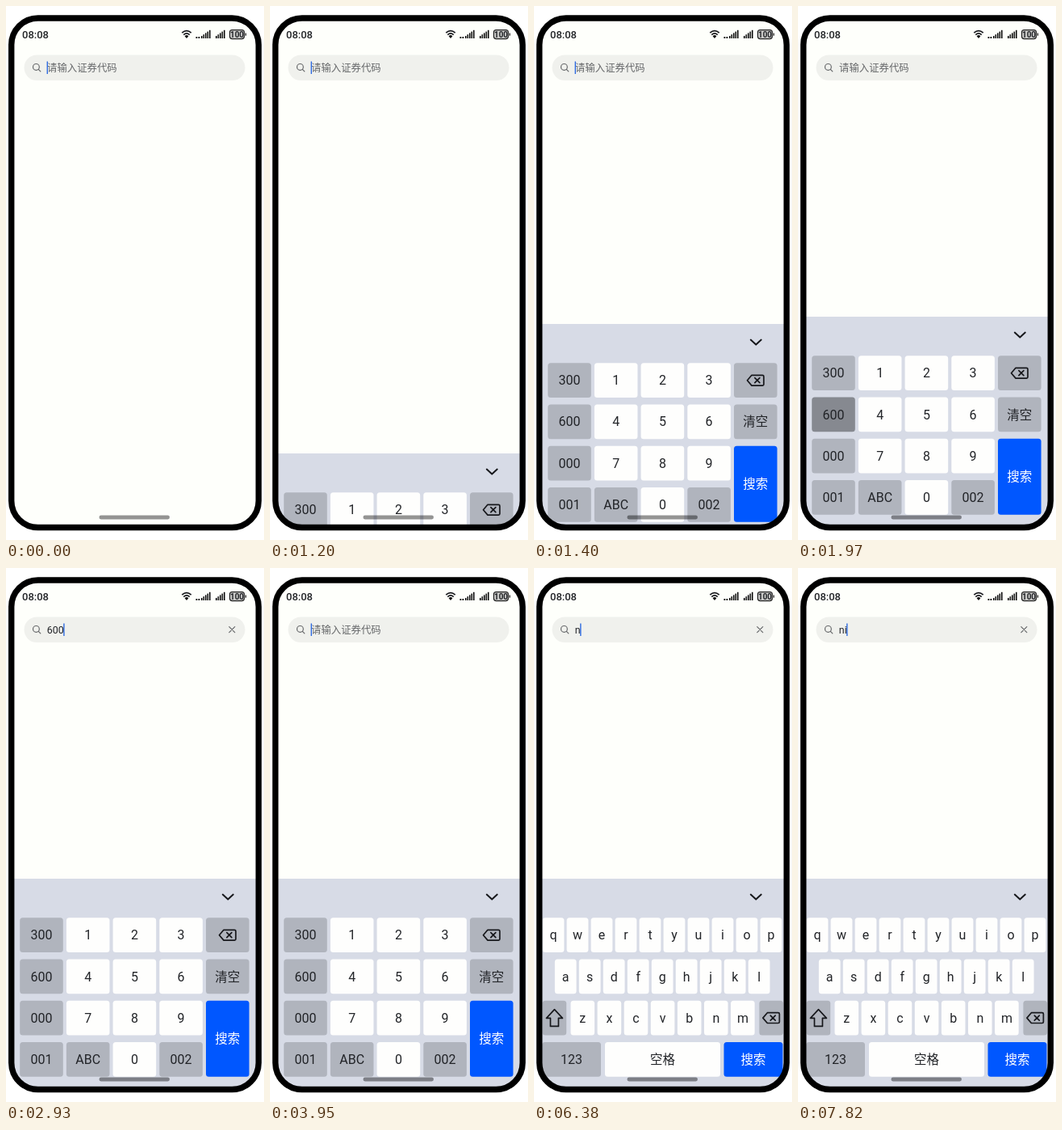
Write an HTML page that moves like this. It is 320 px wide and 660 px high and loops after 8 s.

```html
<!DOCTYPE html>
<html lang="zh">
<head>
<meta charset="utf-8">
<style>
  html, body { margin: 0; width: 320px; height: 660px; overflow: hidden; background: #fff; }
  svg { display: block; }
  text { font-family: Roboto, "Noto Sans CJK SC", "Noto Sans CJK", sans-serif; fill: #222428; }
  .line { fill: none; stroke: #17181c; stroke-width: 1.7; stroke-linecap: round; stroke-linejoin: round; }
</style>
</head>
<body>
<svg width="320" height="660" viewBox="0 0 320 660">
  <clipPath id="screen"><rect x="9" y="17" width="302" height="625" rx="30"/></clipPath>
  <rect x="6.7" y="15" width="306.6" height="629.5" rx="33" fill="#fefffb"/>

  <g id="status">
    <text x="20" y="39.7" font-size="13" font-weight="500" fill="#111">08:08</text>
    <g class="line" stroke-linecap="butt" style="stroke-linecap:butt">
      <path d="M218.3 33.2Q224 28 229.7 33.2M220.3 35.6Q224 32.2 227.7 35.6"/>
    </g>
    <path d="M221.6 37.2Q224 35 226.4 37.2L224 40Z" fill="#111"/>
    <g id="bars" fill="#111"></g>
    <rect x="277.5" y="29.6" width="18" height="11" rx="3" fill="#c9c9c7" stroke="#222" stroke-width="1.2"/>
    <path d="M297.4 33.5v3.2" stroke="#222" stroke-width="1.3"/>
    <text x="286.5" y="38.8" font-size="10" font-weight="700" text-anchor="middle">100</text>
  </g>

  <rect x="22.5" y="60.5" width="274" height="31.5" rx="15.75" fill="#f0f1ed"/>
  <g class="line" style="stroke:#66686a;stroke-width:1.2">
    <circle cx="37.4" cy="75.4" r="3.9"/><path d="M40.3 78.3l2.5 2.5"/>
    <path id="clear" d="M276.8 72.6l7 7m0-7l-7 7"/>
  </g>
  <text id="hint" x="51" y="80.6" font-size="12.4" style="fill:#66686a">请输入证券代码</text>
  <text id="field" x="50.8" y="80.6" font-size="12.4"></text>
  <rect id="caret" y="68.5" width="1.4" height="15.5" fill="#2f6be0"/>

  <g clip-path="url(#screen)">
    <g id="keyboard">
      <rect x="8" y="384" width="304" height="270" fill="#d7dbe6"/>
      <path class="line" style="stroke-width:2" d="M268.8 403.6l6.5 6 6.5-6"/>
      <g id="numeric"></g>
      <g id="letters"></g>
    </g>
  </g>
  <rect x="115.5" y="629.6" width="87.5" height="4.8" rx="2.4" fill="#000" fill-opacity=".42"/>
  <rect x="6.7" y="15" width="306.6" height="629.5" rx="33" fill="none" stroke="#000" stroke-width="7.4"/>
</svg>
<script>
const $ = id => document.getElementById(id);
const WHITE = '#fefefd', GREY = '#b0b4bd', BLUE = '#0057ff';
const ICONS = {
  back: 'M-10.3 0L-4.8-6.4H8.6Q10.2-6.4 10.2-4.8V4.8Q10.2 6.4 8.6 6.4H-4.8ZM-.9-3l6 6m0-6l-6 6',
  shift: 'M0-10.5L10 .2H5V10.3H-5V.2H-10Z'
};
const shades = {};

function add(parent, tag, attrs, text = '') {
  const el = document.createElementNS('http://www.w3.org/2000/svg', tag);
  for (const name in attrs) el.setAttribute(name, attrs[name]);
  el.textContent = text;
  return parent.appendChild(el);
}

function key(board, label, cx, row, w, fill = WHITE, h = 42.8, size = 16) {
  const y = 432.3 + row * 51.2, cy = y + h / 2;
  const box = { x: cx - w / 2, y, width: w, height: h, rx: 3.5 };
  add(board, 'rect', { ...box, fill });
  shades[label] = add(board, 'rect', { ...box, fill: '#000', 'fill-opacity': .24 });
  if (ICONS[label]) {
    add(board, 'path', { class: 'line', d: ICONS[label], transform: `translate(${cx} ${cy})` });
  } else {
    add(board, 'text', {
      x: cx, y: cy + 5.6, 'font-size': size, 'text-anchor': 'middle',
      style: fill === BLUE ? 'fill:#fff' : ''
    }, label);
  }
}

// Status bar signal bars
for (let i = 0; i < 5; i++) {
  const h = 3 + i * 1.8;
  for (const x of [243, 260]) add($('bars'), 'rect', { x: x + i * 2.5 - (x < 250 ? 1 : 0), y: 40 - h, width: 1.6, height: h });
}
for (const x of [235.5, 238.5]) add($('bars'), 'rect', { x, y: 38, width: 1.8, height: 2 });

// Numeric board
const numeric = $('numeric');
['300 1 2 3 back', '600 4 5 6 清空', '000 7 8 9', '001 ABC 0 002'].forEach((line, row) =>
  line.split(' ').forEach((label, col) =>
    key(numeric, label, 44 + col * 57.7, row, 53.6, /^\d$/.test(label) ? WHITE : GREY, 42.8, label === '清空' ? 15.5 : 16)));
key(numeric, '搜索', 274.8, 2, 53.6, BLUE, 94, 15.5);

// Letter board
const letters = $('letters');
[['qwertyuiop', 24, 30, 26.8], ['asdfghjkl', 39.2, 30, 26.8], ['zxcvbnm', 60.3, 33.1, 29.6]].forEach(
  ([chars, x, pitch, w], row) => [...chars].forEach((c, i) => key(letters, c, x + i * pitch, row, w)));
key(letters, 'shift', 25.4, 2, 29.6, GREY);
key(letters, 'back', 294.2, 2, 29.6, GREY);
key(letters, '123', 46.5, 3, 73, GREY);
key(letters, '空格', 159.5, 3, 143, WHITE, 42.8, 15.5);
key(letters, '搜索', 272, 3, 73, BLUE, 42.8, 15.5);
for (const el of document.querySelectorAll('[fill-opacity=".24"], [fill-opacity="0.24"]')) el.style.display = 'none';

// start time, typed text, caret visible, pressed key
const STATES = [
  [0, '', 1], [1730, '', 0], [1970, '', 0, '600'], [2210, '600', 0], [2450, '600', 1],
  [2690, '600', 0], [2930, '600', 1], [3170, '600', 1, '001'], [3410, '600001', 1],
  [3890, '', 1], [5150, '', 1, 'ABC'], [5280, '', 0], [5660, '', 0, 'n'],
  [5900, 'n', 1], [6140, 'n', 0], [6380, 'n', 1], [6620, 'n', 0], [6860, 'n', 1],
  [7100, 'n', 1, 'i'], [7340, 'ni', 1], [7580, 'ni', 0], [7820, 'ni', 1]
];
const show = (el, on) => { el.style.display = on ? '' : 'none'; };

function draw() {
  const t = performance.now() % 8000;
  const [, text, caret, pressed] = STATES.findLast(s => s[0] <= t);

  const step = Math.floor((t - 1200) / 66.7);
  show($('keyboard'), t >= 1200);
  $('keyboard').setAttribute('transform', `translate(0 ${step < 8 ? 169 * .376 ** step : 0})`);
  show(numeric, t < 5280);
  show(letters, t >= 5280);
  for (const label in shades) show(shades[label], label === pressed);

  $('field').textContent = text;
  show($('hint'), !text);
  show($('clear'), text);
  show($('caret'), caret);
  $('caret').setAttribute('x', 50.6 + (text ? $('field').getComputedTextLength() - .3 : 0));
  requestAnimationFrame(draw);
}
draw();
</script>
</body>
</html>
```
